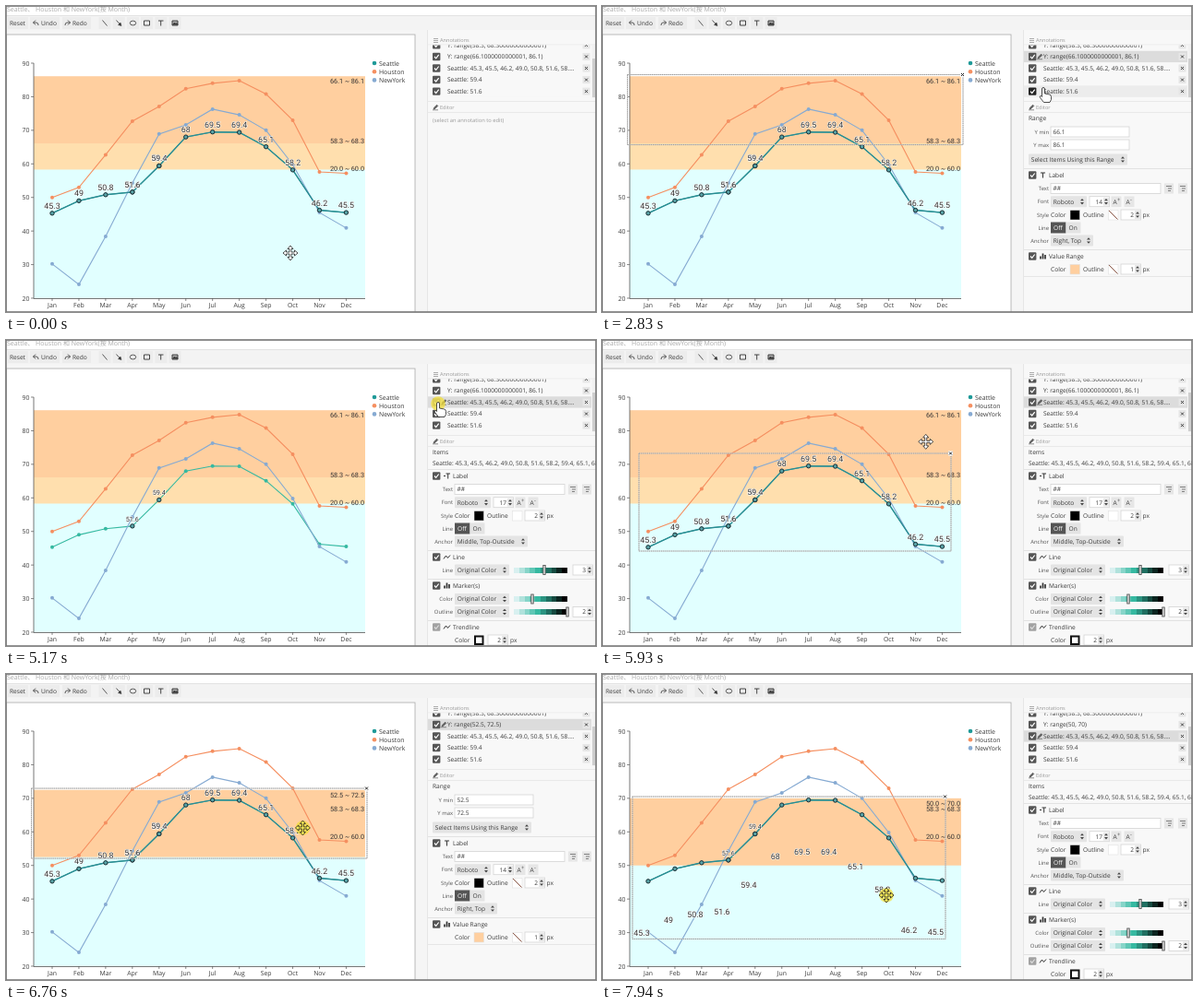
Write an HTML page that moves like this. It is 639 px wide and 332 px high and loops after 8010 ms.

```html
<!DOCTYPE html>
<html lang="en">
<head>
<meta charset="utf-8">
<title>Chart annotation editor</title>
<style>
html, body { margin: 0; width: 100%; height: 100%; overflow: hidden; background: #f5f5f5; }
svg { display: block; width: 639px; height: 332px; }
text { font-family: "Open Sans", "Noto Sans CJK SC", "Noto Sans CJK", sans-serif; font-size: 6.6px; fill: #3a3a3a; text-rendering: geometricPrecision; white-space: pre; }
.mid { text-anchor: middle; }
.end { text-anchor: end; }
.axis { font-size: 6.9px; }
.mute { font-size: 5.6px; fill: #999; }
.title { font-size: 7px; fill: #aaa; }
.field { font-size: 5.9px; fill: #555; }
.value { font-family: Roboto, sans-serif; font-size: 7.3px; fill: #333; }
.big { font-size: 8.9px; }
.halo { paint-order: stroke; stroke: #fff; stroke-width: 1.2; stroke-opacity: .9; }
</style>
</head>
<body>
<svg id="stage" viewBox="0 0 639 332"></svg>
<script>
const LOOP = 8010, STEP = 70;
const NS = 'http://www.w3.org/2000/svg';
const stage = document.getElementById('stage');

function add(parent, tag, attrs = {}, content) {
  const e = document.createElementNS(NS, tag);
  for (const k in attrs) e.setAttribute(k, attrs[k]);
  if (content !== undefined) e.textContent = content;
  parent.appendChild(e);
  return e;
}
const set = (e, attrs) => { for (const k in attrs) e.setAttribute(k, attrs[k]); };
const show = (e, on) => e.setAttribute('visibility', on ? 'visible' : 'hidden');
const group = (p = stage, attrs) => add(p, 'g', attrs);
const rect = (p, x, y, w, h, fill, more) => add(p, 'rect', { x, y, width: w, height: h, fill, ...more });
const label = (p, x, y, s, cls = '') => add(p, 'text', { x, y, class: cls }, s);
const path = (p, d, stroke = '#444', width = .8, fill = 'none') =>
  add(p, 'path', { d, fill, stroke, 'stroke-width': width });

// ---------- frame, toolbar, page ----------
rect(stage, 0, 0, 639, 332, '#f5f5f5');
rect(stage, 0, 0, 639, 10, '#fff');
label(stage, 1, 6, 'Seattle、 Houston 和 NewYork(按 Month)', 'title');
path(stage, 'M0 10.5H639', '#ddd');
rect(stage, 0, 11, 639, 15, '#f3f3f3');
for (const [x, w] of [[2, 22], [26, 32], [61, 31]]) rect(stage, x, 12, w, 13, '#ececec');
label(stage, 4, 21, 'Reset');
label(stage, 38, 21, 'Undo');
label(stage, 72, 21, 'Redo');
path(stage, 'M32 15.5l-2.5 2.5 2.5 2.5M29.5 18h3.5q2 0 2 3', '#333');
path(stage, 'M67 15.5l2.5 2.5-2.5 2.5M69.5 18h-3.5q-2 0-2 3', '#333');
for (let i = 0; i < 6; i++) rect(stage, 100.5 + i * 15.2, 12, 13, 13, '#ececec');
path(stage, 'M104.5 15.5l5 6M119.5 15.5l4 4.5', '#333');
path(stage, 'M125 21.5l-3.5-1 2.5-2.5z', '#333', .5, '#333');
add(stage, 'ellipse', { cx: 137.5, cy: 18.5, rx: 3.2, ry: 2.4, fill: 'none', stroke: '#333', 'stroke-width': .8 });
path(stage, 'M149.5 16h6v5h-6zM165 16h5.5M167.7 16v5.5', '#333', .9);
path(stage, 'M180 16h6v5h-6z', '#333', .9, '#aaa');
path(stage, 'M180.5 20.5l2-2.5 1.5 1.5 1-1 1 2', '#333', .8, '#333');
rect(stage, .5, 31, 442.5, 302, '#fff', { stroke: '#aaa', 'stroke-width': .8 });

// ---------- chart ----------
const X = i => 50 + i * 28.95;
const Y = v => 317 - (v - 20) * 255 / 70;
const months = 'Jan Feb Mar Apr May Jun Jul Aug Sep Oct Nov Dec'.split(' ');
const seattle = [45.3, 49, 50.8, 51.6, 59.4, 68, 69.5, 69.4, 65.1, 58.2, 46.2, 45.5];
const series = [
  ['Seattle', '#36b9a1', seattle],
  ['Houston', '#f58f60', [50, 53, 62.7, 72.7, 77.1, 82.4, 84, 84.8, 80.8, 73, 57.6, 57.2]],
  ['NewYork', '#86aad2', [30.2, 24.1, 38.4, 54.3, 68.9, 71.6, 76.3, 74.6, 70, 59.8, 45.5, 40.9]]
];
const ORANGE = '#ffcf9f', CYAN = '#e1ffff';
const chart = group();
const band = (lo, hi, fill) => rect(chart, 30, Y(hi), 359, Y(lo) - Y(hi), fill);
band(20, 60, CYAN);
band(58.3, 68.3, '#ffdfae');
const topBand = band(66.1, 86.1, ORANGE);

path(chart, 'M30 62V317.5M30 317.5H389', '#555', .8);
for (let v = 20; v <= 90; v += 10) {
  path(chart, `M27 ${Y(v)}h3`, '#555', .7);
  label(chart, 25.5, Y(v) + 2.6, v, 'axis end');
}
months.forEach((m, i) => {
  path(chart, `M${X(i)} 317v3`, '#555', .7);
  label(chart, X(i), 327, m, 'axis mid');
});

const points = data => 'M' + data.map((v, i) => `${X(i)} ${Y(v)}`).join('L');
series.forEach(([name, color, data], k) => {
  path(chart, points(data), color, 1.1);
  data.forEach((v, i) => add(chart, 'circle', { cx: X(i), cy: Y(v), r: 2, fill: color }));
  add(chart, 'circle', { cx: 399, cy: 62 + k * 9.2, r: 2.3, fill: k ? color : '#1f9a98' });
  label(chart, 404, 64.5 + k * 9.2, name, 'axis');
});
const ring = (p, i) => add(p, 'circle', {
  cx: X(i), cy: Y(seattle[i]), r: 2.2, fill: '#58a4a8', stroke: '#1c2d33', 'stroke-width': 1
});
const lineNote = group(chart);
path(lineNote, points(seattle), '#2b8a93', 1.4);
seattle.forEach((v, i) => ring(lineNote, i));

label(chart, 388, Y(68.3) + 8, '58.3 ~ 68.3', 'value end');
label(chart, 388, Y(60) + 8, '20.0 ~ 60.0', 'value end');
const topLabel = label(chart, 388, 0, '', 'value end');
for (const i of [3, 4]) {
  ring(chart, i);
  label(chart, X(i), Y(seattle[i]) - 5, seattle[i], 'value mid halo');
}
const bigLabels = group(chart);
seattle.forEach((v, i) => label(bigLabels, X(i), Y(v) - 5, v, 'value big mid halo'));

const box = group();
const boxBack = rect(box, 0, 0, 0, 0, 'none', { stroke: '#d4d4d4', 'stroke-width': .9 });
const boxDash = rect(box, 0, 0, 0, 0, 'none', { stroke: '#888', 'stroke-width': .8, 'stroke-dasharray': '1.2 1' });
const boxClose = group(box);
rect(boxClose, -2.5, -2.5, 5, 5, '#fff');
path(boxClose, 'M-1.5-1.5l3 3M1.5-1.5l-3 3', '#222', 1);

// ---------- panel ----------
rect(stage, 457, 26, 182, 306, '#f8f8f8');
path(stage, 'M456.5 26V332', '#e2e2e2');
label(stage, 470, 39, 'Annotations', 'mute');
path(stage, 'M463 35.5h5M463 37.5h5M463 39.5h5', '#999', .8);
label(stage, 470, 112, 'Editor', 'mute');
const pencil = (p, x, y) => path(p, `M${x - 2} ${y + 2}l.6-1.8 3-3 1.2 1.2-3 3zM${x - 3} ${y + 2.8}h6`, '#444', .6, '#666');
pencil(stage, 465, 110);
path(stage, 'M457 42H639M457 103.5H639M457 115.5H639', '#e6e6e6');

const checkFill = on => on ? '#555' : '#a2a2a2';
function check(p, y, on = true) {
  const base = rect(p, 462, y - 4.2, 8.4, 8.4, checkFill(on), { rx: 1 });
  path(p, `M464 ${y}l1.7 1.9 3-3.9`, on ? '#fff' : '#ddd', 1.2);
  return base;
}

add(add(stage, 'clipPath', { id: 'rowsClip' }), 'rect', { x: 457, y: 42.5, width: 182, height: 57 });
const list = group(stage, { 'clip-path': 'url(#rowsClip)' });
const rowY = i => 42.4 + i * 12.55;
const rows = [
  'Y: range(58.3, 68.30000000000001)', '',
  'Seattle: 45.3, 45.5, 46.2, 49.0, 50.8, 51.6, 58....',
  'Seattle: 59.4', 'Seattle: 51.6'
].map((s, i) => {
  const y = rowY(i);
  const back = rect(list, 457, y - 6.2, 177, 12.4, '#f8f8f8');
  const base = check(list, y);
  const pen = pencil(list, 474, y);
  const text = label(list, 478, y + 2.4, s);
  rect(list, 624.5, y - 4, 8, 8, '#e6e6e6');
  path(list, `M627 ${y - 1.5}l3 3M630 ${y - 1.5}l-3 3`, '#333', .9);
  return { back, base, pen, text };
});
rect(stage, 634.5, 43, 4, 57, '#f2f2f2');
rect(stage, 635, 57, 3, 42, '#cfcfcf');

const field = (p, y, s) => label(p, 484, y + 2.2, s, 'field end');
const frame = (p, x, y, w) => rect(p, x, y - 5.5, w, 11, '#fff', { stroke: '#d4d4d4', 'stroke-width': .8 });
const input = (p, x, y, w, s) => {
  frame(p, x, y, w);
  return label(p, x + 2.5, y + 2.4, s);
};
const arrows = (p, x, y) => path(p, `M${x - 2} ${y - .9}l2-2.4 2 2.4zM${x - 2} ${y + .9}l2 2.4 2-2.4z`, 'none', 0, '#444');
const spinner = (p, x, y, s) => {
  frame(p, x, y, 21.5);
  label(p, x + 14, y + 2.4, s, 'end');
  rect(p, x + 15, y - 4.5, 6, 9, '#e8e8e8');
  arrows(p, x + 18, y);
};
const menu = (p, x, y, w, s) => {
  rect(p, x, y - 6, w, 12, '#e4e4e4', { rx: .8 });
  label(p, x + 2.8, y + 2.4, s);
  arrows(p, x + w - 5, y);
};
const swatch = (p, x, y, fill) => rect(p, x, y - 5, 10.5, 10.5, fill, { stroke: '#e2e2e2', 'stroke-width': .6 });
const noColor = (p, y) => {
  swatch(p, 548.5, y, '#fff');
  path(p, `M549 ${y - 4.5}l9.5 9.5`, '#854', 1);
};
const icons = {
  text: (x, y) => `M${x - 2.5} ${y - 2.5}h5M${x} ${y - 2.5}v5.5`,
  dashText: (x, y) => `M${x - 3.5} ${y}h2M${x - 1} ${y - 2.5}h4.5M${x + 1.2} ${y - 2.5}v5.5`,
  line: (x, y) => `M${x - 3.5} ${y + 2}l2.5-3.5 2 2.5 2.5-3`,
  bars: (x, y) => `M${x - 2.5} ${y + 3}v-3M${x} ${y + 3}v-6M${x + 2.5} ${y + 3}v-4.5`
};
function section(p, y, icon, title, on = true) {
  path(p, `M457 ${y - 7}H639`, '#ddd');
  check(p, y, on);
  path(p, icons[icon](477.5, y), '#333', icon === 'bars' ? 1.7 : 1);
  label(p, 484, y + 2.4, title);
}
function labelSection(p, y, icon, size, anchor, anchorWidth, outlined) {
  section(p, y, icon, 'Label');
  field(p, y + 14.5, 'Text');
  input(p, 486, y + 14.5, 119, '##');
  for (const x of [609, 624]) {
    rect(p, x, y + 9, 10, 11, '#e6e6e6');
    path(p, `M${x + 2} ${y + 12}h6M${x + 4} ${y + 14.5}h4M${x + 4} ${y + 17}h3`, '#555', .7);
  }
  field(p, y + 28.7, 'Font');
  menu(p, 486, y + 28.7, 39, 'Roboto');
  spinner(p, 528, y + 28.7, size);
  for (const [x, sign] of [[551.5, '+'], [565.5, '-']]) {
    rect(p, x, y + 23, 11, 11.5, '#e6e6e6');
    label(p, x + 2, y + 31, 'A');
    label(p, x + 6.5, y + 28, sign, 'field');
  }
  colorRow(p, y + 43, '#000', 2, outlined);
  field(p, y + 43, 'Style');
  field(p, y + 57, 'Line');
  rect(p, 486, y + 51, 16.5, 12, '#555');
  rect(p, 502.5, y + 51, 16, 12, '#e4e4e4');
  label(p, 489, y + 59.4, 'Off').style.fill = '#fff';
  label(p, 505.5, y + 59.4, 'On');
  field(p, y + 71, 'Anchor');
  menu(p, 486, y + 71, anchorWidth, anchor);
}
function colorRow(p, y, fill, size, outlined) {
  label(p, 486, y + 2.4, 'Color');
  const s = swatch(p, 507, y, fill);
  label(p, 521, y + 2.4, 'Outline');
  if (outlined) swatch(p, 548.5, y, '#fff'); else noColor(p, y);
  spinner(p, 562, y, size);
  label(p, 585.5, y + 2.4, 'px');
  return s;
}

const emptyEditor = group();
const hint = label(emptyEditor, 462, 126, '(select an annotation to edit)', 'mute');
hint.style.fontSize = '5.8px';

const rangeEditor = group();
label(rangeEditor, 462, 124, 'Range');
field(rangeEditor, 136.5, 'Y min');
const minText = input(rangeEditor, 486, 136.5, 85, '');
field(rangeEditor, 150.5, 'Y max');
const maxText = input(rangeEditor, 486, 150.5, 85, '');
menu(rangeEditor, 462, 166.5, 107, 'Select Items Using this Range');
labelSection(rangeEditor, 183.5, 'text', 14, 'Right, Top', 46);
section(rangeEditor, 271.5, 'bars', 'Value Range');
const fillSwatch = colorRow(rangeEditor, 285.5, CYAN, 1);
path(rangeEditor, 'M457 293.5H639', '#e2e2e2');

const itemEditor = group();
label(itemEditor, 462, 124, 'Items');
label(itemEditor, 462, 135.9, 'Seattle: 45.3, 45.5, 46.2, 49.0, 50.8, 51.6, 58.2, 59.4, 65.1, 68.0');
labelSection(itemEditor, 147.5, 'dashText', 17, 'Middle, Top-Outside', 79, true);
const mix = (a, b, p) => `rgb(${a.map((v, i) => Math.round(v + (b[i] - v) * p))})`;
function shadeRow(y, name, at, size) {
  field(itemEditor, y, name);
  menu(itemEditor, 486, y, 59, 'Original Color');
  const teal = [54, 185, 161];
  const bar = group(itemEditor, { 'shape-rendering': 'crispEdges' });
  for (let i = 0; i < 10; i++) {
    const c = i < 4 ? mix([216, 240, 240], teal, i / 4) : mix(teal, [0, 0, 0], (i - 4) / 5);
    rect(bar, 550 + i * 5.8, y - 3, 58 - i * 5.8, 6, c);
  }
  rect(itemEditor, at - 1.2, y - 5, 2.4, 10, '#ddd', { stroke: '#444', 'stroke-width': .8 });
  if (size) spinner(itemEditor, 614, y, size);
}
section(itemEditor, 235.5, 'line', 'Line');
shadeRow(249.5, 'Line', 583, 3);
section(itemEditor, 266.5, 'bars', 'Marker(s)');
shadeRow(281, 'Color', 570);
shadeRow(295, 'Outline', 608, 2);
section(itemEditor, 311.5, 'line', 'Trendline', false);
label(itemEditor, 486, 328, 'Color');
rect(itemEditor, 508, 321.5, 8.5, 8.5, '#fff', { stroke: '#111', 'stroke-width': 2 });
spinner(itemEditor, 522, 325.5, 2);
label(itemEditor, 546, 328, 'px');

rect(stage, .4, .4, 638.2, 331.2, 'none', { stroke: '#777', 'stroke-width': .8 });

// ---------- pointer ----------
const pointer = group();
const glow = add(pointer, 'circle', { r: 7.8, fill: '#f4df35', 'fill-opacity': .72 });
const cursors = {
  move: path(pointer, 'M0-8l3 3.5h-2v3.5h3.5v-2l3.5 3-3.5 3v-2h-3.5v3.5h2l-3 3.5-3-3.5h2v-3.5h-3.5v2l-3.5-3 3.5-3v2h3.5v-3.5h-2z', '#222', .8, '#fff'),
  hand: path(pointer, 'M-1.5 0q0-1.5 1.5-1.5t1.5 1.5v5l5 1q2 .5 2 2.5v3l-1.5 3h-6.5l-4-5q-1-2 1-2l1 1z', '#222', .8, '#fff'),
  arrow: path(pointer, 'M0 0v11l2.7-2.5 1.8 4 1.7-.8-1.8-3.8h3.6z', '#222', .8, '#fff')
};

// ---------- timeline ----------
// pointer moves: start, number of steps, end x, end y
const moves = [
  [750, 10, 329, 130], [1580, 3, 371, 128], [1790, 5, 287, 145], [2140, 3, 325, 135],
  [2620, 4, 478, 90], [2900, 4, 499, 70], [4100, 4, 468, 69], [5580, 8, 329, 118],
  [6620, 4, 320, 176], [7030, 5, 315, 174], [7520, 7, 308, 240]
];
const presses = [[70, 420], [2480, 2620], [3300, 3570], [4570, 4770], [5170, 5380], [6140, 6350], [6480, 7030], [7380, LOOP]];
const picks = [[0, ''], [140, 'low'], [2550, 'top'], [3370, 'items'], [6210, 'top'], [7520, 'items']];

function progress(t, start, steps) {
  if (t < start) return 0;
  const p = Math.min(1, (Math.floor((t - start) / STEP) + 1) / steps);
  return p * p * (3 - 2 * p);
}
function pointerAt(t) {
  let x = 308, y = 268;
  for (const [start, steps, tx, ty] of moves) {
    const p = progress(t, start, steps);
    x += (tx - x) * p;
    y += (ty - y) * p;
  }
  return [x, y];
}
const round = v => Math.round(v * 10) / 10;

function draw(t) {
  const pick = picks.filter(p => p[0] <= t).pop()[1];
  const hidden = t >= 4640 && t < 5240;
  const pressed = presses.some(([a, b]) => t >= a && t < b);
  const [px, py] = pointerAt(t);
  const slide = progress(t, 6620, 4), drag = progress(t, 7520, 7);
  const lo = round(66.1 - 16.1 * slide), hi = round(lo + 20);

  set(topBand, { y: Y(hi), height: Y(lo) - Y(hi) });
  topLabel.textContent = `${lo.toFixed(1)} ~ ${hi.toFixed(1)}`;
  set(topLabel, { y: Y(hi) + 8 });
  show(lineNote, !hidden);
  show(bigLabels, !hidden);
  const dx = -7 * drag, dy = 64 * drag;
  set(bigLabels, { transform: `translate(${dx} ${dy})` });

  const bounds = {
    low: [27.5, Y(60) - 2, 391, 319.5],
    top: [27.5, Y(hi) - 1.7, 391, Y(lo) + 1.5],
    items: [40 + dx, Math.min(133, 123 + dy), Math.max(372, 378 + dx), Math.max(229, 223.5 + dy)]
  }[pick];
  show(box, bounds && !hidden);
  if (bounds) {
    const [x, y, r, b] = bounds;
    for (const e of [boxBack, boxDash]) set(e, { x, y, width: r - x, height: b - y });
    set(boxClose, { transform: `translate(${r - .5} ${y})` });
  }

  show(emptyEditor, !pick);
  show(rangeEditor, pick === 'low' || pick === 'top');
  show(itemEditor, pick === 'items');
  minText.textContent = pick === 'low' ? 20 : lo;
  maxText.textContent = pick === 'low' ? 60 : hi;
  set(fillSwatch, { fill: pick === 'low' ? CYAN : ORANGE });

  const inList = px > 457 && px < 634 && py > 43 && py < 99;
  const chosen = { top: 1, items: 2 }[pick];
  rows[1].text.textContent = `Y: range(${slide ? lo : '66.1000000000001'}, ${hi})`;
  rows.forEach((row, i) => {
    const hover = inList && Math.abs(py - rowY(i)) < 6.2;
    set(row.back, { fill: i === chosen ? '#dcdcdc' : hover ? '#ececec' : '#f8f8f8' });
    show(row.pen, i === chosen);
    const on = !(i === 2 && hidden);
    set(row.base, { fill: on && hover ? '#222' : checkFill(on) });
  });

  const kind = inList ? 'hand' : px < 391 ? 'move' : 'arrow';
  for (const k in cursors) show(cursors[k], k === kind);
  set(cursors.move, { fill: pressed ? '#f8ec55' : '#fff' });
  show(glow, pressed);
  set(pointer, { transform: `translate(${px} ${py})` });
}

function tick() {
  draw(performance.now() % LOOP);
  requestAnimationFrame(tick);
}
tick();
</script>
</body>
</html>
```
